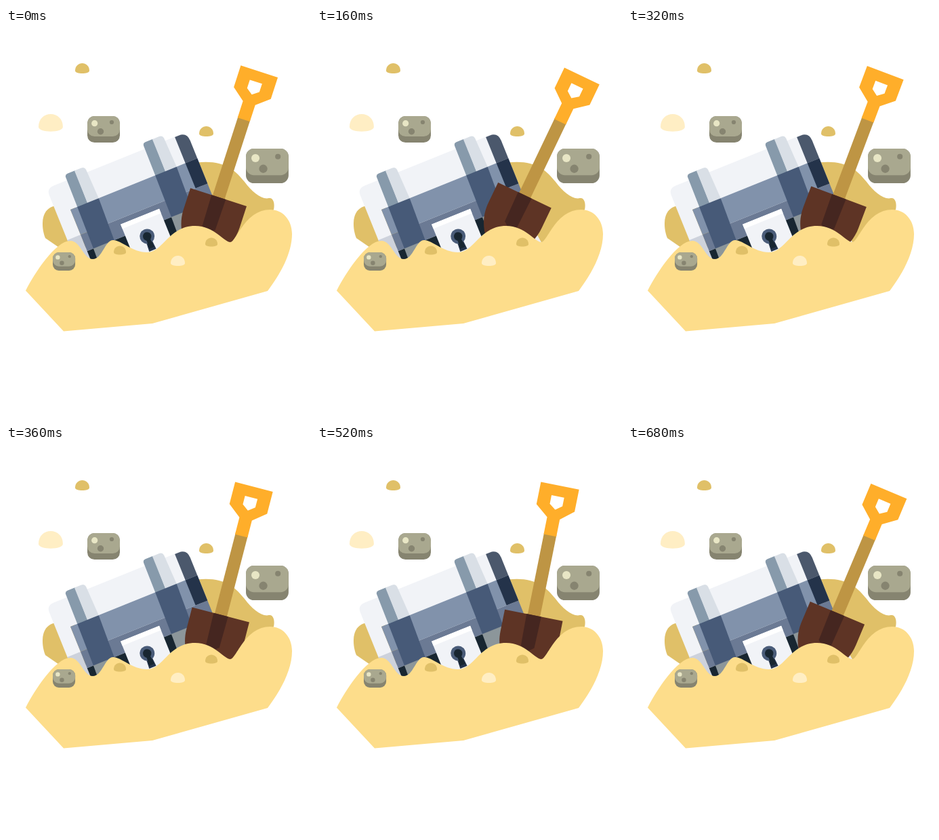
Write an HTML page that moves like this. It is 450x574 px and loops after 0.8 s.

```html
<!DOCTYPE html>
<html lang="en">
<head>
<meta charset="utf-8">
<title>Buried chest</title>
<style>
  html, body { margin: 0; width: 100%; height: 100%; overflow: hidden; background: #fff; }
  svg { display: block; width: 450px; height: 574px; }
  .stone { rx: var(--r); ry: var(--r); }
</style>
</head>
<body>
<svg viewBox="0 0 450 574">
  <defs>
    <g id="rock">
      <rect class="stone" width="48" height="39" fill="#868470"/>
      <rect class="stone" width="48" height="30" fill="#a9a88f"/>
      <circle cx="10.7" cy="10.7" r="4.6" fill="#e8e6c5"/>
      <g fill="#868470">
        <circle cx="19.5" cy="22.7" r="4.7"/>
        <circle cx="36" cy="9" r="3.1"/>
      </g>
    </g>
    <path id="clod" d="M0 11C0 4 5 0 10.5 0S21 4 21 11C21 13.8 16 15 10.5 15S0 13.8 0 11Z"/>
    <g id="strap">
      <path d="M11 1L11.500-47Q12-51 16-51H28L27 1Z" fill="#879aab"/>
      <path d="M27 1V-51H38Q43-51 43.500-46L45 1Z" fill="#d9dfe6"/>
      <path d="M11 0H45L43 66H10Z" fill="#475a78"/>
      <path d="M10 66H43V100H9Z" fill="#8c969a"/>
    </g>
  </defs>

  <g fill="#e0c068">
    <path d="M74 262C58 265 54 277 54 289C54 298 56 305 58 310L90 332L130 320L100 262Z"/>
    <path d="M270 200C318 192 335 206 352 227C363 242 378 254 388 251C394 250 397 258 395 268L345 322L331 317L325 306L300 250Z"/>
  </g>
  <path d="M304 300L325 306L332 318L300 322Z" fill="#eeeef1"/>

  <g transform="translate(95 268) rotate(-22)">
    <path d="M-21 50V-31Q-21-42-10-42H190V0H0V50Z" fill="#f1f3f7"/>
    <path d="M-21 40H0V80H-21Z" fill="#cdd2dc"/>
    <path d="M0 0H202V40H0Z" fill="#8192ab"/>
    <path d="M0 40H202V66H0Z" fill="#6b7a94"/>
    <path d="M0 66H202V100H0Z" fill="#182631"/>
    <path d="M183 0V-41.500H189Q202-41.500 202-28V0Z" fill="#4b586c"/>
    <path d="M183 0H202V40H183Z" fill="#24334a"/>
    <use href="#strap"/>
    <use href="#strap" x="124"/>
    <path d="M60.500 48H122V110H60.500Z" fill="#f1f3f7"/>
    <path d="M60.500 48H122V55H60.500Z" fill="#fff"/>
    <g transform="translate(90.200 79)">
      <path d="M-4 0H4L5.500 22H-5.500Z" fill="#24334a"/>
      <circle r="11" fill="#4a5c79"/>
      <circle r="6.300" fill="#182631"/>
      <path d="M-2.500 0H2.500L4 18H-4Z" fill="#182631"/>
    </g>
  </g>

  <g id="shovel">
    <path d="M-9.300-66H9.300V60H-9.300Z" fill="#be9544"/>
    <path fill="#ffae2a" fill-rule="evenodd" d="M-28.700-138H28.700V-104.500L9.500-89V-63.300H-9.500V-89L-28.700-104.500ZM-9.500-122V-109L0-102L9.500-109V-122Z"/>
    <path d="M-43.800 57H43.300V90C43.300 125 20 145 0 160C-20 145-43.800 125-43.800 90Z" fill="#5e3425"/>
    <path d="M-11 57H11L10 104.500L0 112L-10 104.500Z" fill="#452620"/>
  </g>

  <path fill="#fddd8b" d="M29 387.500L85 447.500L216 436L386 388C405 363 422 332 422 304C422 283 408 268 390 268C352 268 340 316 331 316C322 316 307 292 279 292C240 292 232 331 208 331C186 331 170 313 158 313C146 313 142 341 128 341C114 341 110 314 95 314C73 314 42 362 29 387.500Z"/>

  <g fill="#e0c068">
    <use href="#clod" transform="translate(102 52)"/>
    <use href="#clod" transform="translate(285 145)"/>
    <use href="#clod" transform="translate(159 321.500) scale(.86)"/>
    <use href="#clod" transform="translate(294 309.500) scale(.86)"/>
  </g>
  <g fill="#ffeec4">
    <use href="#clod" transform="translate(48 127) scale(1.710)"/>
    <use href="#clod" transform="translate(243 336)"/>
  </g>
  <use href="#rock" transform="translate(120 130)" style="--r:10.5px"/>
  <use href="#rock" transform="translate(354 178) scale(1.310)" style="--r:9px"/>
  <use href="#rock" transform="translate(69 331) scale(.69)" style="--r:13px"/>
</svg>
<script>
  const LOOP = 800, STEP = 40, LAST = 680, REST = 17.9;
  // [time in ms, swing in degrees]
  const keys = [[0, 0], [235, 10], [440, -10], [690, 5]];
  const shovel = document.getElementById('shovel');

  function swing(t) {
    const i = keys.findIndex(k => k[0] > t);
    const [t0, a] = keys[i - 1], [t1, b] = keys[i];
    return a + (b - a) * (1 - Math.cos(Math.PI * (t - t0) / (t1 - t0))) / 2;
  }

  function draw(now) {
    const t = Math.min(Math.floor(now % LOOP / STEP) * STEP, LAST);
    shovel.setAttribute('transform', `translate(331.3 195.4) rotate(${REST + swing(t)})`);
    requestAnimationFrame(tick);
  }

  let start;
  function tick(now) {
    start ??= now;
    draw(now - start);
  }

  draw(0);
</script>
</body>
</html>
```
